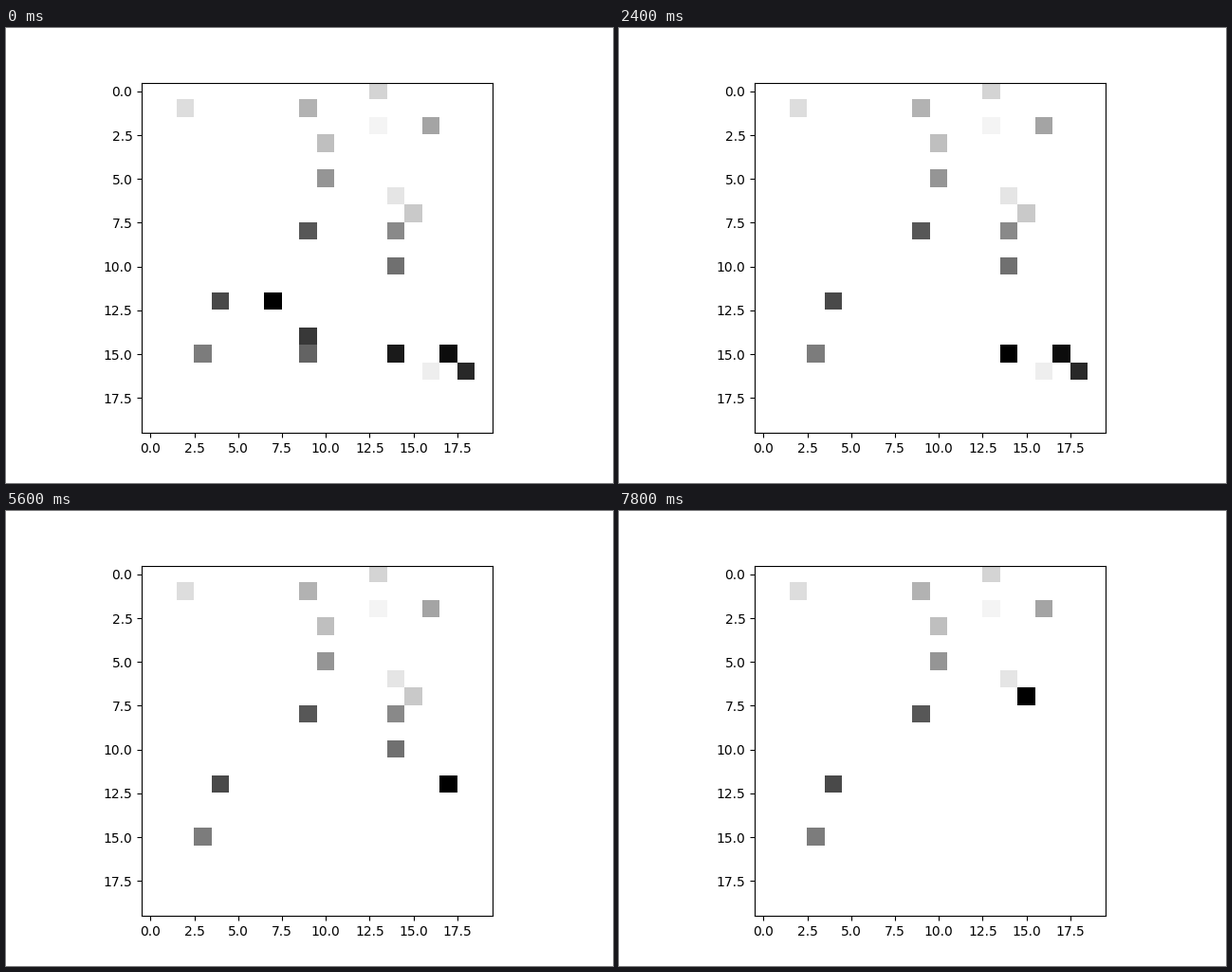
A matplotlib script for the animation above (8000 ms loop, 640x480 px).

```python
import math

import matplotlib.pyplot as plt
import numpy as np
from matplotlib.animation import FuncAnimation

SIZE = 20
FRAMES = 40
START = (12, 7)

# (row, column) of each goal, from the palest to the darkest.
GOALS = [
    (2, 13), (16, 16), (6, 14), (1, 2), (0, 13), (7, 15), (3, 10),
    (1, 9), (2, 16), (5, 10), (8, 14), (15, 3), (10, 14), (15, 9),
    (8, 9), (12, 4), (14, 9), (16, 18), (15, 14), (15, 17),
]
FIRST_SHADE = 2
AGENT_SHADE = FIRST_SHADE + len(GOALS)


def step_towards(pos, goal):
    """Move one cell along the longer remaining axis, rows first on a tie."""
    row, col = pos
    d_row, d_col = goal[0] - row, goal[1] - col
    if abs(d_row) >= abs(d_col):
        return row + int(np.sign(d_row)), col
    return row, col + int(np.sign(d_col))


def plan():
    """Walk to the nearest goal each time, pausing one frame to collect it.

    Returns the agent's position and the goals left for every frame.
    """
    pos, left = START, set(GOALS)
    states = [(pos, left)]
    while len(states) < FRAMES:
        goal = min(left, key=lambda cell: math.dist(cell, pos))
        while pos != goal:
            pos = step_towards(pos, goal)
            states.append((pos, left))
        left = left - {goal}
        states.append((pos, left))
    return states[:FRAMES]


STATES = plan()


def grid_at(frame):
    agent, left = STATES[frame]
    grid = np.zeros((SIZE, SIZE))
    for shade, goal in enumerate(GOALS, FIRST_SHADE):
        if goal in left:
            grid[goal] = shade
    grid[agent] = AGENT_SHADE
    return grid


fig, ax = plt.subplots(figsize=(6.4, 4.8), dpi=100)
image = ax.imshow(grid_at(0), cmap="Greys", vmin=0, vmax=AGENT_SHADE)


def update(frame):
    image.set_data(grid_at(frame))
    return [image]


anim = FuncAnimation(fig, update, frames=FRAMES, interval=200, repeat=True)
plt.show()
```
